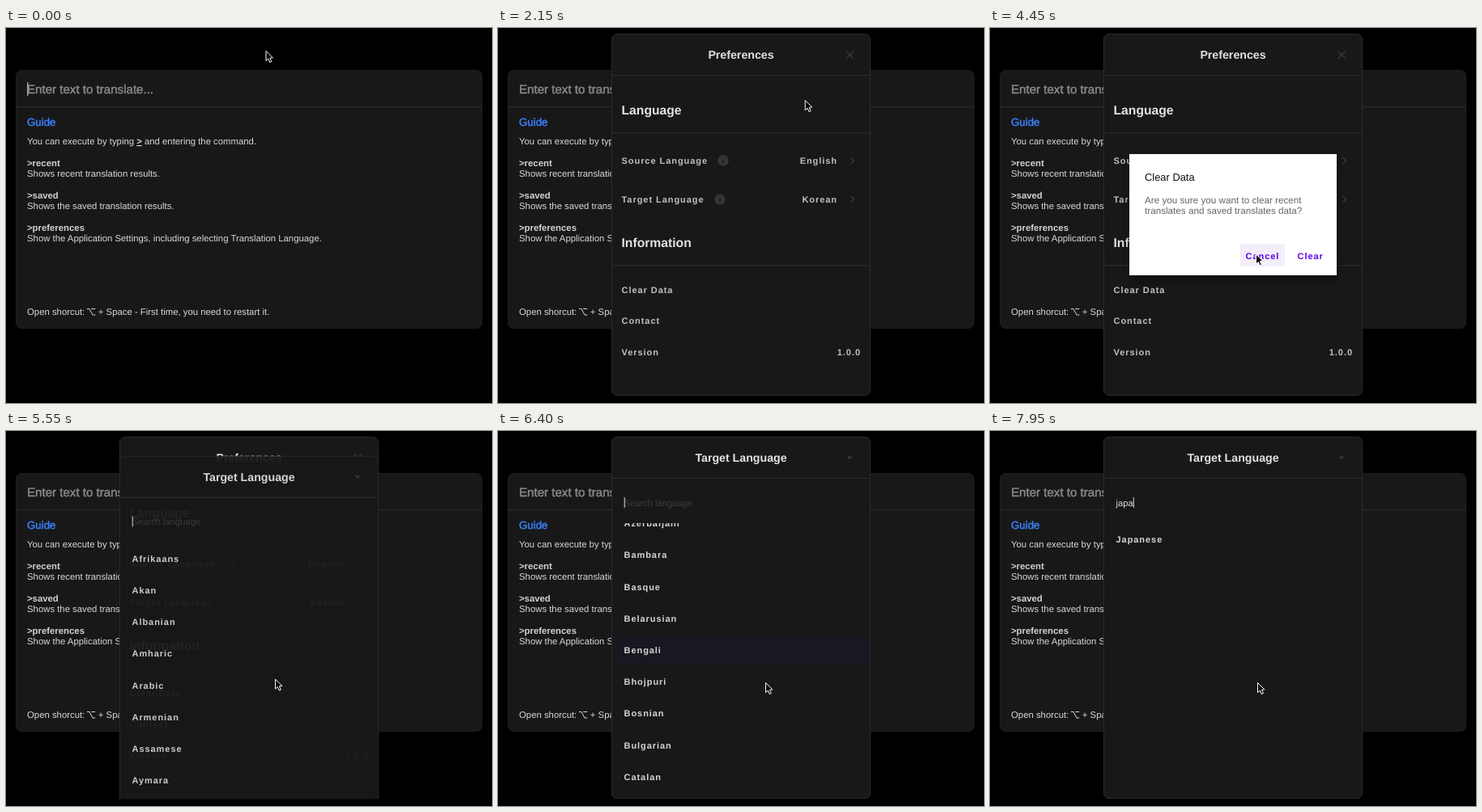
An HTML page for the animation above (8000 ms loop, 600x464 px).

```html
<!DOCTYPE html>
<html lang="en">
<head>
<meta charset="utf-8">
<title>Translator preferences</title>
<style>
  html, body { margin: 0; width: 100%; height: 100%; overflow: hidden; background: #000; }
  svg { display: block; width: 600px; height: 464px; }
  text {
    font-family: "Liberation Sans", Arial, sans-serif;
    font-size: 11.35px; fill: #d8d8d8; white-space: pre;
    text-rendering: geometricPrecision;
  }
  .bold, .title, .head, .row { font-weight: 700; }
  .bold { fill: #d2d2d2; }
  .input { font-size: 15.1px; fill: #878787; stroke: #878787; stroke-width: .5px; }
  .typed { fill: #eee; stroke: #eee; }
  .guide { font-size: 13.3px; fill: #3a7ff6; stroke: #3a7ff6; stroke-width: .5px; }
  .title { font-size: 14.2px; fill: #e2e2e2; text-anchor: middle; }
  .head { font-size: 15.7px; fill: #e2e2e2; }
  .row { font-size: 11px; letter-spacing: .95px; fill: #c0c0c0; }
  .item { fill: #d6d6d6; }
  .end { text-anchor: end; }
  .search { font-size: 11.2px; }
  .purple { fill: #6200ee; }
  .ask { font-size: 11.7px; fill: #666; }
  .askTitle { font-size: 12.9px; fill: #111; }
  .panel { fill: #181818; stroke: #2a2a2a; }
  .rule { stroke: #2e2e2e; }
  .hover { fill: #1b1720; }
  .icon { fill: none; stroke: #3c3c3c; stroke-width: 1.1; }
  .caret { fill: #dcdcdc; }
</style>
</head>
<body>
<svg viewBox="0 0 600 464">
  <defs>
    <clipPath id="win"><rect x="140" y="7" width="320" height="448.5"/></clipPath>
    <clipPath id="listArea"><rect x="141" y="114" width="318" height="341"/></clipPath>
    <filter id="shade" x="-20%" y="-20%" width="140%" height="150%">
      <feDropShadow dx="0" dy="7" stdDeviation="6" flood-opacity=".4"/>
    </filter>
  </defs>

  <g id="main">
    <rect class="panel" x="12.5" y="52.5" width="575" height="319" rx="6.5" style="stroke:#1e1e1e"/>
    <path class="rule" d="M12 97.5H588"/>
    <text class="input" x="26" y="80.8"><tspan id="typed" class="typed"></tspan><tspan id="hint"></tspan></text>
    <rect id="mainCaret" class="caret" y="67" width="1" height="17"/>
    <path d="M100 347.5h3l4 7.5h3.2M105.2 347.5h5" fill="none" stroke="#d8d8d8"/>
  </g>

  <g id="prefs">
    <rect class="panel" x="140.5" y="7.5" width="319" height="447" rx="6.5"/>
    <rect id="prefHover" class="hover" x="141" width="318"/>
    <path class="rule" d="M141 58.5H459M141 130H459M141 294H459"/>
    <path class="icon" d="M429.5 28.5l9.5 9.5m0-9.5l-9.5 9.5M435.5 160l4 4-4 4M435.5 208l4 4-4 4"/>
  </g>

  <g id="ask">
    <rect x="172" y="156" width="256" height="150" fill="#fff" filter="url(#shade)"/>
    <rect id="cancelHover" x="309" y="267" width="55" height="28" rx="3" fill="#f2eefa"/>
  </g>

  <g clip-path="url(#win)">
    <g id="picker">
      <rect class="panel" x="140.5" y="7.5" width="319" height="447" rx="6.5"/>
      <path class="rule" d="M141 58.5H459"/>
      <path d="M430.5 31.5h7l-3.5 3.8z" fill="#383838"/>
      <text id="query" class="search" x="155.5" y="92.5"></text>
      <rect id="findCaret" class="caret" y="82" width="1" height="13"/>
      <g clip-path="url(#listArea)">
        <rect id="listHover" class="hover" x="141" width="318" height="39.2"/>
        <g id="list"></g>
      </g>
    </g>
  </g>

  <path id="pointer" d="M0 0V12.1L2.8 9.5L4.7 14L6.8 13.1L4.9 8.7L8.4 8.4Z" fill="#000" stroke="#fff" stroke-linejoin="round"/>
</svg>

<script>
const LOOP = 8000, PITCH = 39.2, LIST_TOP = 114.4;
const COMMANDS = ['>recent', '>saved', '>preferences'];
const LANGUAGES = ('Afrikaans,Akan,Albanian,Amharic,Arabic,Armenian,Assamese,Aymara,Azerbaijani,' +
  'Bambara,Basque,Belarusian,Bengali,Bhojpuri,Bosnian,Bulgarian,Catalan,Cebuano,Chichewa,' +
  'Chinese (Simplified),Chinese (Traditional),Corsican,Croatian,Czech,Danish,Dhivehi,Gujarati,' +
  'Japanese,Javanese,Punjabi,Tajik').split(',');

// Timelines: [ms, value]
const COMMAND_KEYS = [[0, ''], [650, '>'], [880, '>p'], [1030, '>pr'], [1150, '>pre'],
  [1300, '>pref'], [1450, '>preferences'], [1850, '']];
const SEARCH_KEYS = [[5300, ''], [6900, 'j'], [7150, 'ja'], [7400, 'jap'], [7700, 'japa']];
const POINTER = [[0, 321, 28.5], [2050, 321, 28.5], [2350, 494, 210], [2600, 402, 330], [2900, 300, 376],
  [3080, 258, 362], [3250, 248, 340.5], [3400, 226, 325], [3600, 226, 326], [4250, 328.5, 281],
  [4450, 328.5, 280], [4700, 328.5, 280], [5050, 335, 212], [5270, 335, 212], [5550, 332.5, 307],
  [5750, 330.5, 311.5], [8000, 330.5, 311.5]];
const SCROLL = [[0, 0], [5850, 0], [6050, 90], [6280, 290], [6400, 333], [6750, 455], [8000, 455]];

const $ = id => document.getElementById(id);
const clamp = v => Math.max(0, Math.min(1, v));
const fade = (t, from, to, ms) => clamp((t - from) / ms) * (1 - clamp((t - to) / ms));
const show = (id, on) => $(id).setAttribute('opacity', +on);

function addText(parent, cls, x, y, str) {
  const el = document.createElementNS('http://www.w3.org/2000/svg', 'text');
  el.setAttribute('class', cls);
  el.setAttribute('x', x);
  el.setAttribute('y', y);
  el.textContent = str;
  $(parent).append(el);
  return el;
}

function track(steps, t, col = 1) {
  let i = 0;
  while (i < steps.length - 2 && t >= steps[i + 1][0]) i++;
  const a = steps[i], b = steps[i + 1];
  return a[col] + (b[col] - a[col]) * clamp((t - a[0]) / (b[0] - a[0]));
}

function lastKey(keys, t) {
  let hit = keys[0];
  for (const k of keys) if (t >= k[0]) hit = k;
  return hit;
}

const blink = (t, since) => (t - since) % 1000 < 500;

addText('main', 'guide', 26, 120.5, 'Guide');
addText('main', '', 26, 144, '').innerHTML =
  'You can execute by typing <tspan font-weight="700" text-decoration="underline">&gt;</tspan> and entering the command.';
['Shows recent translation results.', 'Shows the saved translation results.',
 'Show the Application Settings, including selecting Translation Language.'].forEach((line, i) => {
  addText('main', 'bold', 26, 171 + 40 * i, COMMANDS[i]);
  addText('main', '', 26, 184.2 + 40 * i, line);
});
addText('main', '', 26, 355.3, 'Open shorcut:');
addText('main', '', 113.8, 355.3, '+ Space - First time, you need to restart it.');

addText('prefs', 'title', 300, 38, 'Preferences');
addText('prefs', 'head', 152.5, 106.5, 'Language');
addText('prefs', 'head', 152.5, 270.5, 'Information');
[['Source Language', 168, 'English', 278], ['Target Language', 216, 'Korean', 274]].forEach(([name, y, value, x]) => {
  addText('prefs', 'row', 152.5, y, name);
  addText('prefs', 'row end', 419, y, value);
  $('prefs').insertAdjacentHTML('beforeend',
    `<circle cx="${x}" cy="${y - 4}" r="6.7" fill="#353535"/>
     <path d="M${x} ${y - 7.6}v1.4m0 1.2v4.6" stroke="#181818" stroke-width="1.4"/>`);
});
addText('prefs', 'row', 152.5, 327.7, 'Clear Data');
addText('prefs', 'row', 152.5, 366.2, 'Contact');
addText('prefs', 'row', 152.5, 404.5, 'Version');
addText('prefs', 'row end', 448, 404.5, '1.0.0');

addText('ask', 'askTitle', 191, 188.5, 'Clear Data');
addText('ask', 'ask', 191, 217.3, 'Are you sure you want to clear recent');
addText('ask', 'ask', 191, 230.3, 'translates and saved translates data?');
addText('ask', 'row purple', 315.5, 285.5, 'Cancel');
addText('ask', 'row purple', 379.5, 285.5, 'Clear');

addText('picker', 'title', 300, 38, 'Target Language');
const items = LANGUAGES.map(name => addText('list', 'row item', 155.5, 0, name));

function drawCommand(t) {
  const [since, typed] = lastKey(COMMAND_KEYS, t);
  const match = typed && COMMANDS.find(c => c.startsWith(typed));
  $('typed').textContent = typed;
  $('hint').textContent = match ? match.slice(typed.length) : 'Enter text to translate...';
  const width = typed ? $('typed').getComputedTextLength() : 0;
  $('mainCaret').setAttribute('x', 26.3 + width);
  show('mainCaret', t < 1850 && blink(t, since));
}

function drawPrefs(t, y) {
  const rows = [[140, 48], [188, 48], [304.5, 38.5], [343, 38.5]];
  const hit = rows.find(([top, h]) => y >= top && y < top + h);
  const free = (t > 2600 && t < 3500) || (t > 4850 && t < 5400);
  show('prefs', fade(t, 1900, 9e9, 130));
  show('prefHover', Boolean(hit && free));
  if (hit) {
    $('prefHover').setAttribute('y', hit[0]);
    $('prefHover').setAttribute('height', hit[1]);
  }
}

function drawPicker(t, y) {
  // critically damped slide from below
  const u = 18.26 * Math.max(0, t - 5295) / 1000;
  const rest = Math.exp(-u) * (1 + u);
  $('picker').setAttribute('transform', `translate(0 ${448 * rest})`);
  show('picker', 1 - rest);

  const [since, query] = lastKey(SEARCH_KEYS, t);
  const box = $('query');
  box.textContent = query || 'Search language';
  box.style.fill = query ? '#e0e0e0' : '#3d3d3d';
  $('findCaret').setAttribute('x', 155.7 + (query ? box.getComputedTextLength() : 0));
  show('findCaret', blink(t, since));

  const scroll = query ? 0 : track(SCROLL, t);
  let n = 0;
  LANGUAGES.forEach((name, i) => {
    const on = name.toLowerCase().includes(query);
    items[i].style.display = on ? '' : 'none';
    if (on) items[i].setAttribute('y', LIST_TOP + PITCH * (n++ + .5) + 4 - scroll);
  });
  // the highlight trails the scrolling list
  const row = Math.floor((y - LIST_TOP + track(SCROLL, t - 120)) / PITCH);
  $('listHover').setAttribute('y', LIST_TOP + row * PITCH - scroll);
  show('listHover', t > 5950 && !query);
}

function draw(t) {
  const x = track(POINTER, t, 1), y = track(POINTER, t, 2);
  const lagY = track(POINTER, t - 120, 2);
  drawCommand(t);
  drawPrefs(t, lagY);
  show('ask', fade(t, 3450, 4680, 150));
  show('cancelHover', t > 4120 && x > 309 && x < 364 && y > 267 && y < 295);
  drawPicker(t, lagY);
  $('pointer').setAttribute('transform', `translate(${x} ${y})`);
  show('pointer', t < 600 || t >= 2050);
}

const start = performance.now();
function tick() {
  draw((performance.now() - start) % LOOP);
  requestAnimationFrame(tick);
}
tick();
</script>
</body>
</html>
```
